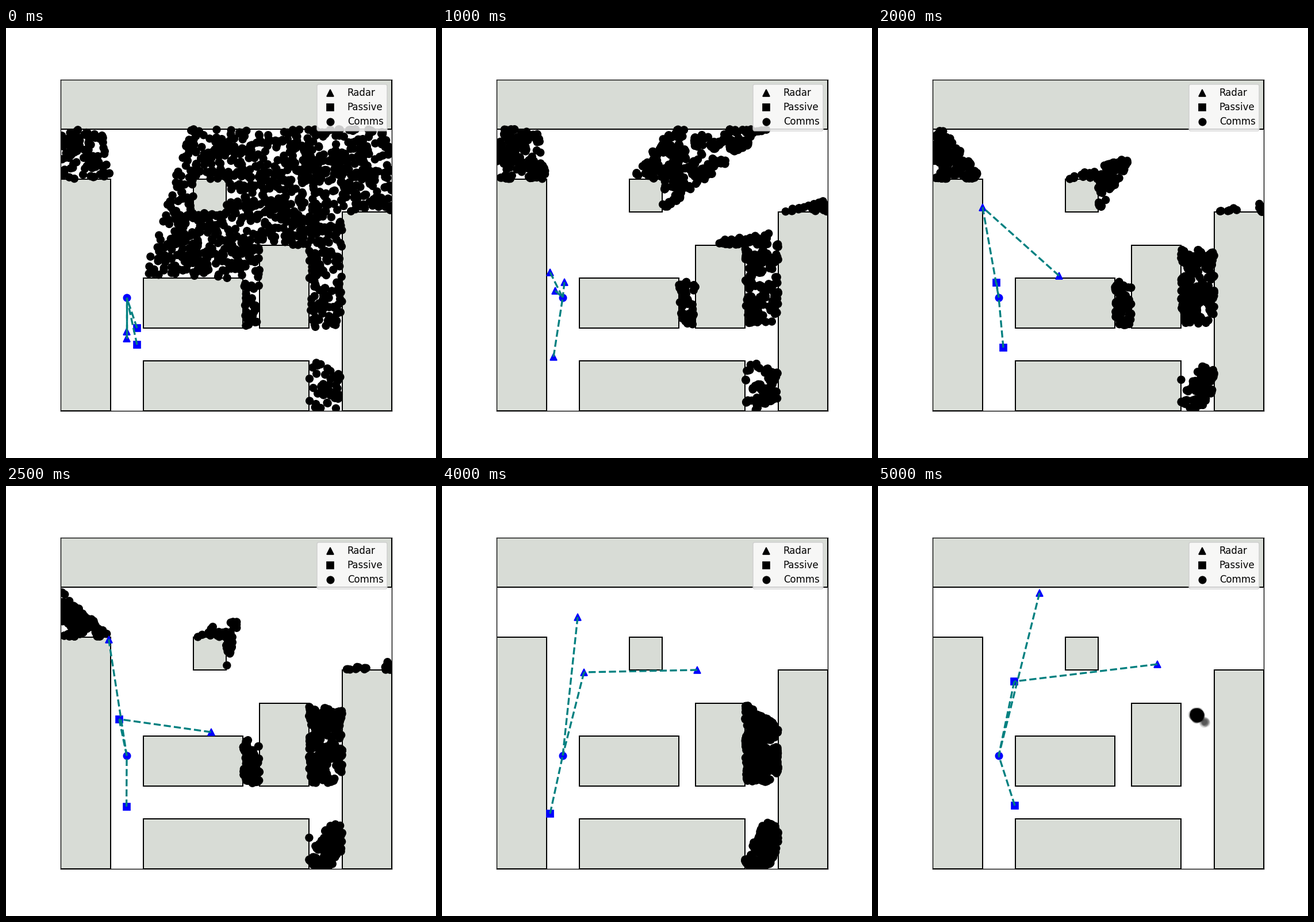
These frames come from a looping animation (748 by 748 pixels, 5500 ms). A matplotlib script:

```python
import numpy as np
import matplotlib.pyplot as plt
from matplotlib.animation import FuncAnimation
from matplotlib.patches import Rectangle

FRAMES, INTERVAL = 11, 500
COUNT, JITTER = 1250, 2.5
STAGE = 748
SIDE = 0.77 * STAGE
CELL = SIDE / 20
LEFT, TOP = 0.5125 * STAGE - SIDE / 2, 0.12 * STAGE
rng = np.random.default_rng(12)

# Buildings as (column, row, width, height) in cells, rows from the top.
BLOCKS = [(0, 0, 20, 3), (0, 6, 3, 14), (5, 17, 10, 3), (5, 12, 6, 3),
          (12, 10, 3, 5), (17, 8, 3, 12), (8, 6, 2, 2)]
RECTS = [(LEFT + c * CELL, TOP + r * CELL, w * CELL, h * CELL)
         for c, r, w, h in BLOCKS]

# Each agent passes a few waypoints; KEYS holds their frames.
BASE = np.array([210, 469])
KEYS = [0, 1, 2, 4, 6, 8, 10]
ROUTES = np.array([
    [(228, 551), (195, 579), (194, 572), (218, 556),
     (198, 560), (188, 570), (238, 556)],
    [(228, 522), (198, 483), (197, 457), (206, 443),
     (184, 354), (247, 324), (237, 340)],
    [(210, 528), (183, 477), (188, 425), (182, 312),
     (174, 204), (236, 228), (281, 186)],
    [(210, 540), (212, 488), (213, 442), (315, 431),
     (414, 424), (444, 320), (486, 310)]])
MARKERS = ["ss^ssss", "ss^s^^s", "^" * 7, "^" * 7]


def key_before(frame):
    return np.searchsorted(KEYS, frame, side="right") - 1


def positions(frame):
    k = key_before(frame)
    n = min(k + 1, len(KEYS) - 1)
    t = (frame - KEYS[k]) / max(KEYS[n] - KEYS[k], 1)
    return ROUTES[:, k] + (ROUTES[:, n] - ROUTES[:, k]) * t ** 1.25


def is_free(p):
    x, y = p.T
    ok = (x > LEFT) & (x < LEFT + SIDE) & (y > TOP) & (y < TOP + SIDE)
    for rx, ry, w, h in RECTS:
        ok &= ~((x > rx) & (x < rx + w) & (y > ry) & (y < ry + h))
    return ok


def is_hidden(p, eye):
    """True where a building blocks the line from eye to a point."""
    d = p - eye + 1e-9
    blocked = np.zeros(len(p), bool)
    for rx, ry, w, h in RECTS:
        a = (np.array([rx, ry]) - eye) / d
        b = (np.array([rx + w, ry + h]) - eye) / d
        enter = np.minimum(a, b).max(axis=1)
        leave = np.maximum(a, b).min(axis=1)
        blocked |= (enter < leave) & (leave > 0) & (enter < 1)
    return blocked


def unseen(p, frame):
    for eye in positions(frame):
        p = p[is_hidden(p, eye)]
    return p


def resample(p):
    p = p[rng.integers(len(p), size=COUNT)]
    moved = p + rng.normal(0, JITTER, p.shape)
    return np.where(is_free(moved)[:, None], moved, p)


def search_clouds(frames):
    p = np.array([LEFT, TOP]) + rng.random((8 * COUNT, 2)) * SIDE
    p = unseen(p[is_free(p)], 0)[:COUNT]
    clouds = [(p, np.ones(len(p)))]
    for frame in range(1, frames):
        p = unseen(resample(unseen(p, frame)), frame)
        clouds.append((p, np.ones(len(p))))
    return clouds


def found_cloud(center):
    """A dense cluster with a faint one trailing behind it."""
    faint = rng.normal(np.add(center, (13, 12)), 2.2, (14, 2))
    main = rng.normal(center, 2.4, (900, 2))
    return np.vstack([faint, main]), np.repeat([0.07, 0.13], [14, 900])


def link_end(spots, i):
    """Next hop on the shortest clear way from agent i to the base."""
    def length(hop):
        return np.hypot(*(spots[i] - hop)) + np.hypot(*(hop - BASE))

    hops = [BASE, *np.delete(spots, i, axis=0)]
    clear = [h for h in hops if not is_hidden(h[None], spots[i])[0]]
    return min(clear, key=length, default=BASE)


clouds = search_clouds(9) + [found_cloud((567, 412)), found_cloud((555, 399))]

fig = plt.figure(figsize=(STAGE / 120, STAGE / 120), dpi=120)
ax = fig.add_subplot(aspect="equal")
ax.set(xlim=(LEFT, LEFT + SIDE), ylim=(TOP + SIDE, TOP), xticks=[], yticks=[])

for x, y, w, h in RECTS:
    ax.add_patch(Rectangle((x, y), w, h, fc="#d8dcd6", ec="black", lw=1.2))
dots = ax.scatter([], [], s=74, linewidths=0, zorder=2)
ax.plot(*BASE, "bo", ms=7.4, zorder=3)
agents = [ax.plot([], [], "b^", ms=7.4, zorder=3)[0] for _ in ROUTES]
links = [ax.plot([], [], "--", color="teal", lw=2, zorder=4)[0] for _ in ROUTES]
for mark, label in zip("^so", ("Radar", "Passive", "Comms")):
    ax.plot([], [], "k" + mark, ms=7.4, label=label)
ax.legend(loc="upper right", labelspacing=0.42, borderpad=0.38)


def update(frame):
    points, alpha = clouds[frame]
    dots.set_offsets(points)
    dots.set_facecolors([(0, 0, 0, a) for a in alpha])
    spots = positions(frame)
    for i, (agent, link) in enumerate(zip(agents, links)):
        agent.set_data(spots[i][:1], spots[i][1:])
        agent.set_marker(MARKERS[i][key_before(frame)])
        link.set_data(*np.transpose([spots[i], link_end(spots, i)]))
    return [dots, *agents, *links]


anim = FuncAnimation(fig, update, frames=FRAMES, interval=INTERVAL,
                     repeat=True, repeat_delay=0, blit=False)
plt.show()
```
